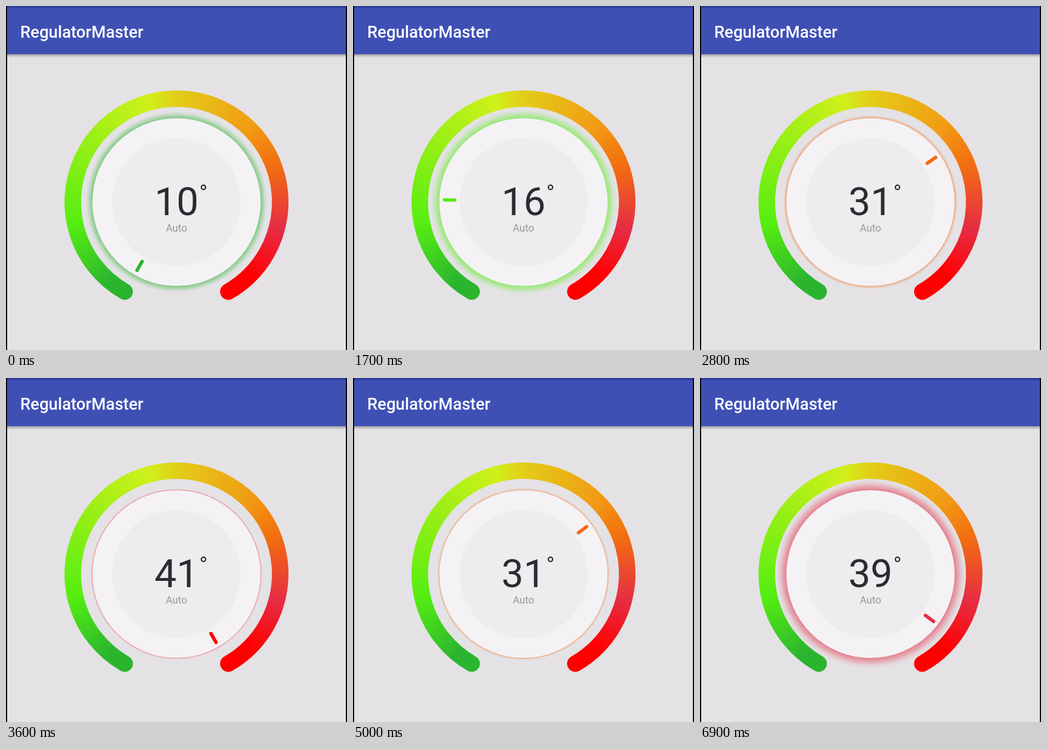
An HTML page with a canvas that plays this animation: 600 px wide and 607 px high, repeating every 7000 ms.

```html
<!DOCTYPE html>
<html lang="en">
<head>
<meta charset="utf-8">
<title>Regulator dial</title>
<style>
  html, body { margin: 0; width: 100%; height: 100%; overflow: hidden; background: #e4e2e5; }
  canvas { display: block; width: 600px; height: 607px; }
</style>
</head>
<body>
<canvas id="stage" width="600" height="607"></canvas>
<script>
const ctx = document.getElementById('stage').getContext('2d');
const LOOP = 7000, STEP = 100, CX = 300, CY = 346, RAD = Math.PI / 180;

// Colours the pointer and glow step through along the scale
const SCALE = ['#2bb52f', '#55ee11', '#d6ec08', '#f0a415', '#f66a10', '#e62c44', '#ff0000'];

// Ring gradient: degrees clockwise from the bottom, colour
const RING = [
  [0, '#2bb52f'], [40, '#2bb52f'], [78, '#55ee11'], [165, '#d0f01a'], [180, '#e3cd17'],
  [225, '#f29a14'], [248, '#f2700f'], [285, '#e62c44'], [315, '#ff0000'], [360, '#ff0000']
];

// Pointer: time in ms, degrees travelled along the 300 degree scale
const DRAG = [[0, 0], [1200, 0], [2100, 111], [3500, 300], [3900, 300], [5000, 203], [6000, 254], [6900, 277]];

const ringPaint = ctx.createConicGradient(90 * RAD, CX, CY);
for (const [deg, color] of RING) ringPaint.addColorStop(deg / 360, color);

function travelAt(t) {
  const i = DRAG.findIndex(([time]) => time >= t);
  if (i <= 0) return DRAG[i < 0 ? DRAG.length - 1 : 0][1];
  const [t0, a] = DRAG[i - 1], [t1, b] = DRAG[i];
  return a + (b - a) * (t - t0) / (t1 - t0);
}

function rect(x, y, w, h, paint) {
  ctx.fillStyle = paint;
  ctx.fillRect(x, y, w, h);
}

function disc(r, paint) {
  ctx.fillStyle = paint;
  ctx.beginPath();
  ctx.arc(CX, CY, r, 0, 2 * Math.PI);
  ctx.fill();
}

function stroke(width, paint, trace) {
  ctx.lineWidth = width;
  ctx.strokeStyle = paint;
  ctx.lineCap = 'round';
  ctx.beginPath();
  trace();
  ctx.stroke();
}

function text(string, x, y, font, color, align = 'center') {
  ctx.font = font + ' Roboto, sans-serif';
  ctx.fillStyle = color;
  ctx.textAlign = align;
  ctx.fillText(string, x, y);
}

function drawScreen() {
  rect(0, 0, 600, 607, '#e4e2e5');
  const shadow = ctx.createLinearGradient(0, 85, 0, 91);
  shadow.addColorStop(0, 'rgba(0,0,0,.3)');
  shadow.addColorStop(1, 'rgba(0,0,0,0)');
  rect(0, 85, 600, 6, shadow);
  rect(0, 0, 600, 85, '#3f50b5');
  rect(0, 0, 600, 4, '#303f9f');
  rect(0, 0, 2, 607, '#000');
  rect(598, 0, 2, 607, '#000');
  text('RegulatorMaster', 25, 56, '500 29px', '#fff', 'left');
}

function drawGlow(t, color) {
  const breath = (1 + Math.cos((t - 1050) / 6000 * 2 * Math.PI)) / 2;
  const outer = 150.5 + 16 * breath ** 1.6;
  const glow = ctx.createRadialGradient(CX, CY, 147, CX, CY, outer);
  for (const [at, alpha] of [[0, '90'], [.35, '58'], [.7, '1c'], [1, '00']]) {
    glow.addColorStop(at, color + alpha);
  }
  disc(outer, glow);
}

function draw(t) {
  const travel = travelAt(t), part = travel / 300;
  const color = SCALE[Math.floor(part * 6 + .01)];
  const value = Math.min(41, 10 + Math.floor(part * 32));

  drawScreen();
  stroke(29, ringPaint, () => ctx.arc(CX, CY, 182.5, 120 * RAD, 420 * RAD));
  drawGlow(t, color);
  disc(148, '#f4f2f5');
  disc(113, '#eeecef');

  const angle = (120 + travel) * RAD, dx = Math.cos(angle), dy = Math.sin(angle);
  stroke(6, color, () => {
    ctx.moveTo(CX + 121 * dx, CY + 121 * dy);
    ctx.lineTo(CX + 139 * dx, CY + 139 * dy);
  });

  text(value, CX, 369, '400 69px', '#2d2b2f');
  text('Auto', CX, 398, '400 18px', '#99979a');
  stroke(2.3, '#2d2b2f', () => ctx.arc(347.5, 320, 3.8, 0, 2 * Math.PI));
}

function tick() {
  const t = performance.now() % LOOP;
  draw(Math.floor(t / STEP) * STEP);
  requestAnimationFrame(tick);
}
tick();
</script>
</body>
</html>
```
